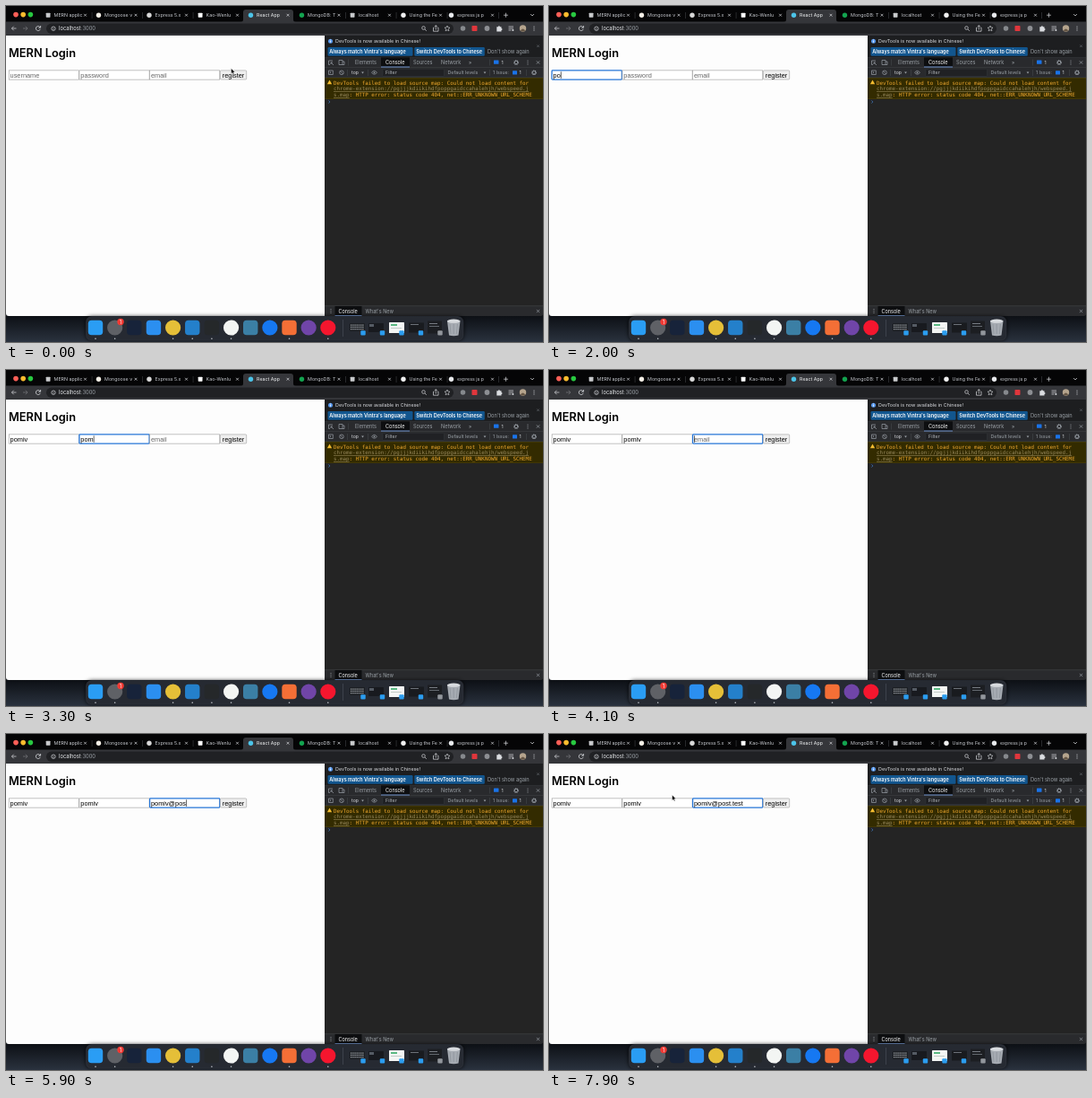
Animation, 600 px wide and 375 px high, one loop 8000 ms. Source, as an HTML page:

```html
<!DOCTYPE html>
<html lang="en">
<head>
<meta charset="utf-8">
<title>MERN Login</title>
<style>
  html, body { margin: 0; width: 100%; height: 100%; overflow: hidden; background: #12161c; }
  svg { display: block; width: 600px; height: 375px; }
  text { font-family: Inter, Roboto, sans-serif; white-space: pre; }
  .form { font-family: "Liberation Sans", Arial, sans-serif; }
  .mono { font-family: "DejaVu Sans Mono", monospace; }
</style>
</head>
<body>
<svg id="stage" viewBox="0 0 600 375" xmlns="http://www.w3.org/2000/svg"></svg>
<script>
const stage = document.getElementById('stage');
const LOOP = 8000;
const GREY = '#9aa0a6', LIGHT = '#dadce0', BLUE = '#1a73e8';

const rect = (x, y, w, h, fill, r = 0, extra = '') =>
  `<rect x="${x}" y="${y}" width="${w}" height="${h}" fill="${fill}" rx="${r}" ${extra}/>`;
const disc = (x, y, r, fill, extra = '') =>
  `<circle cx="${x}" cy="${y}" r="${r}" fill="${fill}" ${extra}/>`;
const line = (d, color = GREY, width = .7) =>
  `<path d="${d}" fill="none" stroke="${color}" stroke-width="${width}"/>`;
const text = (x, y, s, size, fill, extra = '') =>
  `<text x="${x}" y="${y}" font-size="${size}" fill="${fill}" ${extra}>${s}</text>`;
const cross = (x, y, r = 1.5, color = LIGHT) =>
  line(`M${x - r} ${y - r}l${2 * r} ${2 * r}m0 ${-2 * r}l${-2 * r} ${2 * r}`, color);
const dots = (x, y, color = GREY) => [-2, 0, 2].map(d => disc(x, y + d, .6, color)).join('');
const ring = (x, y, r, color = GREY) => disc(x, y, r, 'none', `stroke="${color}" stroke-width=".7"`);
const gear = (x, y) => disc(x, y, 2.2, 'none', `stroke="${GREY}" stroke-width="1.2" stroke-dasharray="1.1 .6"`) + ring(x, y, 1.7);
const arrowDown = (x, y, color = GREY) => `<path d="M${x - 1.4} ${y - .9}h2.8l-1.4 2z" fill="${color}"/>`;

function tabBar() {
  const tabs = [
    [47, 'MERN applic', '#c8cacc'], [103.5, 'Mongoose v', '#f4efe6'], [160, 'Express 5.x', '#d8d8d8'],
    [217, 'Kao-Wenlu', '#ffffff'], [273.5, 'React App', '#4cc4e8'], [330.5, 'MongoDB: T', '#13a34f'],
    [387, 'localhost', '#c8cacc'], [444, 'Using the Fe', '#f0f0f0'], [497.5, 'express js p', '#e8eaed']
  ];
  let out = rect(0, 0, 600, 18, '#050506');
  ['#ff5f57', '#febc2e', '#28c840'].forEach((c, i) => out += disc(11 + 8.2 * i, 9.6, 2.8, c));
  out += `<path d="M262 18q3 0 3-3V7q0-3 3-3h50q3 0 3 3v8q0 3 3 3z" fill="#35363a"/>`;
  tabs.forEach(([x, label, color], i) => {
    out += i % 3 ? disc(x, 10.2, 2.7, color) : rect(x - 2.3, 7.7, 4.8, 5, color, .6);
    out += text(x + 6.6, 12.1, label, 5.3, i == 4 ? '#f1f3f4' : '#c8cbd0');
    out += cross(x + (i == 8 ? 46 : 41.5), 10.2, 1.4);
    if (i != 3 && i != 4) out += rect(x + (i == 8 ? 53 : 48.8), 7, .5, 7, '#4a4c50');
  });
  return out + line('M556 10.2h5m-2.5-2.5v5', LIGHT) + line('M586 9l2 2 2-2', LIGHT);
}

function toolbar() {
  let out = rect(0, 17.5, 600, 15.5, '#35363a') + rect(45, 19.5, 455, 11.5, '#202124', 5.7);
  out += line('M11.5 25h-5m2.2-2.3L6.4 25l2.3 2.3', LIGHT);
  out += line('M19 25h5m-2.2-2.3L24.1 25l-2.3 2.3', '#77797d');
  out += line('M38.2 24a2.5 2.5 0 1 0 .1 1.8M38.6 22v2.2h-2.2', LIGHT, .8);
  out += ring(53, 25.2, 2.2, LIGHT) + rect(52.7, 24.6, .6, 2, LIGHT);
  out += text(59, 27.2, 'localhost<tspan fill="#9aa0a6">:3000</tspan>', 5.8, '#e8eaed');
  out += ring(466.5, 24.5, 1.8, LIGHT) + line('M468 26l1.8 1.8', LIGHT);
  out += line('M478.5 24.2h-1v4h5.5v-4h-1M480.3 26.5v-4.8m-1.5 1.4l1.5-1.5 1.5 1.5', LIGHT);
  out += line('M493 22l.9 2 2.1.2-1.6 1.5.5 2.1-1.9-1.1-1.9 1.1.5-2.1-1.6-1.5 2.1-.2z', LIGHT, .6);
  out += disc(510.5, 25, 2.8, '#86898d') + rect(520.5, 22, 6, 6, '#e0363c', .8) + disc(537.5, 25, 2.9, '#8d8f93');
  out += `<path d="M548.3 23.2h1.6a1 1 0 0 1 2 0h1.6v1.7a1 1 0 0 1 0 2v1.7h-5.2z" fill="${LIGHT}"/>`;
  out += line('M561.5 23h5.5m-5.5 2h5.5m-5.5 2h3', LIGHT) + disc(566.4, 27, 1, LIGHT);
  out += disc(577.5, 25, 3.7, '#b5a48d') + `<path d="M574.8 27.4q2.7-4 5.4 0q-2.7 2.2-5.4 0" fill="#665746"/>`;
  return out + dots(590, 25, LIGHT);
}

function page() {
  let out = `<path d="M0 33h356v313H3q-3 0-3-3z" fill="#fdfdfd"/>`;
  out += text(3, 56.9, 'MERN Login', 12.8, '#000', 'font-weight="600"');
  for (let i = 0; i < 3; i++) {
    out += `<rect id="box${i}" x="${3.2 + 78.7 * i}" y="71.9" width="78.2" height="10.2" fill="#fff"/>`;
    out += text(4.6 + 78.7 * i, 79.6, '', 7.35, '#000', `class="form" id="value${i}"`);
  }
  out += rect(239.4, 71.9, 29.3, 10.1, '#efefef', 1, 'stroke="#8a8a8a" stroke-width=".5"');
  return out + text(241.8, 79.6, 'register', 7.35, '#000', 'class="form"');
}

function devtools() {
  let out = `<path d="M356 33H600V343q0 3-3 3H356z" fill="#242424"/>`;
  const strip = (y, h, fill) => rect(356, y, 244, h, fill);
  const rule = y => strip(y, .5, '#494c50');

  // Language notice
  out += strip(33, 24, '#1d1e20') + rule(57);
  out += disc(362.5, 39.2, 2.5, '#5a9bf0') + rect(362.1, 38.7, .8, 2, '#fff') + rect(362.1, 37.5, .8, .7, '#fff');
  out += text(368, 41.2, 'DevTools is now available in Chinese!', 5.4, LIGHT);
  out += rect(359.5, 46, 95, 9.8, '#12568f', 1.2) + rect(456.3, 46, 78.5, 9.8, '#12568f', 1.2);
  out += text(361.3, 52.9, "Always match Vintra's language", 5.5, '#fff', 'font-weight="600"');
  out += text(458.3, 52.9, 'Switch DevTools to Chinese', 5.5, '#fff', 'font-weight="600"');
  out += text(538, 52.9, "Don't show again", 5.7, GREY) + cross(594.5, 44.7, 1.2, '#6b6f74');

  // Panel tabs
  out += strip(57.4, 11, '#292a2d') + rule(68.4);
  out += line('M365 61h-4.5v4.5h1.5M363 63l3 3m-3-1v-2h2', GREY);
  out += line('M372 60.5h4v5h-4zM376 62h2v3.5h-2', GREY) + rect(382, 59.5, .5, 7, '#494c50');
  out += rect(419, 57.4, 32, 11, '#0d0e10') + rect(419, 67.6, 32, .9, '#8ab4f8');
  [[390, 'Elements'], [424, 'Console'], [455, 'Sources'], [486, 'Network'], [517, '»']].forEach(([x, s], i) =>
    out += text(x, 64.8, s, 5.55, i == 1 ? '#fff' : GREY));
  out += rect(540, 59.5, .5, 7, '#494c50') + rect(545, 60.5, 5.5, 4.3, BLUE, .5) + text(553.5, 64.8, '1', 5.3, LIGHT);
  out += gear(570, 63) + dots(583, 63) + cross(594.5, 63, 1.7, GREY);

  // Console controls
  out += strip(68.9, 10.8, '#292a2d') + rule(79.7);
  out += line('M360.5 72h4.8v4.5h-4.8zM361.8 73.2l1.2 1-1.2 1', GREY);
  out += ring(375, 74.3, 2.3) + line('M373.4 72.7l3.2 3.2') + rect(381.5, 71, .5, 7, '#494c50');
  out += text(386, 76.2, 'top', 5.2, LIGHT) + arrowDown(398.5, 74.3) + rect(404, 71, .5, 7, '#494c50');
  out += line('M408.5 74.3q3-3.8 6 0q-3 3.8-6 0', GREY) + disc(411.5, 74.3, .9, GREY);
  out += rect(420.5, 70.3, 69, 8.2, '#202124', 1, 'stroke="#3c4043" stroke-width=".4"');
  out += text(424, 76.3, 'Filter', 5.4, '#b0b4b9') + text(493.5, 76.2, 'Default levels', 5.3, GREY) + arrowDown(535, 74.3);
  out += rect(540, 71, .5, 7, '#494c50') + text(544, 76.2, '1 Issue:', 5.2, GREY);
  out += rect(566, 72.3, 5, 4.2, BLUE, .5) + text(573.5, 76.2, '1', 5.2, LIGHT);
  out += rect(581, 71, .5, 7, '#494c50') + gear(590, 74.3);

  // Warning
  const mono = 'class="mono"', link = mono + ' text-decoration="underline"';
  out += strip(80.2, 23.6, '#332b00') + strip(80.2, .4, '#594a00') + strip(103.4, .4, '#594a00');
  out += `<path d="M361.5 82.6l2.6 4.6h-5.2z" fill="#f5bd30"/>`;
  out += text(366, 87.6, 'DevTools failed to load source map: Could not load content for', 5.85, '#f0a92e', mono);
  out += text(366, 94.3, 'chrome-extension://pgjjjkdiikihdfpoppgaidccahalehjh/webspeed.j', 5.85, '#97885c', link);
  out += text(366, 101, '<tspan fill="#97885c" text-decoration="underline">s.map</tspan>: HTTP error: status code 404, net::ERR_UNKNOWN_URL_SCHEME', 5.85, '#f0a92e', mono);
  out += line('M360.3 105.4l1.6 1.6-1.6 1.6', '#3f7fca');

  // Drawer
  out += `<path d="M356 335H600V343q0 3-3 3H356z" fill="#292a2d"/>` + rule(334.6);
  out += dots(363, 340.5) + rect(367.5, 335, 30, 11, '#0d0e10') + rect(367.5, 345.2, 30, .8, '#8ab4f8');
  out += text(371.5, 342.6, 'Console', 5.5, '#fff') + text(401.5, 342.6, "What's New", 5.5, GREY);
  return out + cross(594.5, 340.5, 1.6, GREY);
}

function dock() {
  const apps = ['#2a9df4', '#5f6166', '#17233a', '#2b8ff0', '#e5bf38', '#2480cb', '#25282a',
    '#f3f5f3', '#3b7fa5', '#1678f2', '#f46f36', '#7045a8', '#f5162e'];
  const round = [1, 4, 7, 9, 11, 12];
  let out = rect(89.5, 347, 421.5, 26, '#000', 6, 'filter="url(#soft)"');
  out += rect(89.5, 346.6, 421.5, 26.6, '#262a32', 6, 'stroke="#3d424c" stroke-width=".4"');
  apps.forEach((color, i) => {
    const x = 100 + 21.65 * i;
    out += round.includes(i) ? disc(x, 359, 8.6, color) : rect(x - 8.2, 350.8, 16.4, 16.4, color, 3.8);
    if ([0, 1, 4, 5, 6, 7, 10, 12].includes(i)) out += disc(x, 371.2, .8, '#c4c8cf');
  });
  out += disc(128, 352.5, 3.7, '#f23b35') + text(126.8, 354.6, '1', 5.6, '#fff');
  out += rect(376, 350, .5, 19, '#555a64');

  // Minimised windows
  out += rect(384, 354, 17, 9, '#1b1e22', 1);
  for (let i = 0; i < 21; i++) out += rect(385 + i % 7 * 2.2, 355.5 + (i / 7 | 0) * 2.3, 1.3, 1.2, '#aeb2b8');
  out += rect(405, 354, 17, 10, '#181a1f', .6) + rect(406, 355, 5, 3, '#555b64');
  out += rect(428, 353, 17, 12, '#f3f5f4', .6) + rect(430, 355, 7, 2, '#5bb983') + rect(430, 359, 12, 1, '#c4cbc8');
  out += rect(450, 353.5, 17, 11, '#191b1f', .6) + rect(452, 355, 9, 1, '#6d7279');
  out += rect(471, 351.5, 16, 14, '#1c1e22', .6) + rect(473, 354, 9, 1, '#777c83') + rect(473, 357, 11, 1, '#646970');
  [399, 420.5, 442, 463.5, 485].forEach((x, i) => out += rect(x - 2.7, 362.2, 5.4, 5.4, i == 4 ? '#92969c' : '#2b9df0', 1));

  // Bin
  out += `<path d="M493 351.5h14.5l-2 16q-5.2 1.6-10.5 0z" fill="#a6abb2"/>`;
  out += `<ellipse cx="500.2" cy="351.7" rx="7.3" ry="2.1" fill="#d7dade"/>`;
  return out + line('M496 355l1 11m3.2-11v11m4.2-11l-1 11', '#858b93', .6);
}

stage.innerHTML = `<defs><linearGradient id="desk" x2="0" y2="1">
  <stop offset=".15" stop-color="#0c0f14"/><stop offset="1" stop-color="#2a323e"/></linearGradient>
  <filter id="soft" x="-5%" y="-60%" width="110%" height="220%"><feGaussianBlur stdDeviation="2.5"/></filter></defs>`
  + rect(0, 340, 600, 35, 'url(#desk)')
  + tabBar() + toolbar() + page() + devtools() + dock()
  + `<rect id="caret" y="73.3" width=".6" height="7.6" fill="#000"/>
  <path id="arrow" d="M0 0v6.2l1.5-1.3 1 2.2 1-.5-1-2.1h2z" fill="#000" stroke="#fff" stroke-width=".5"/>
  <path id="beam" d="M-1.4-3.2q1.4 0 1.4.8v4.8q0 .8-1.4.8m2.8-6.4q-1.4 0-1.4.8m0 4.8q0 .8 1.4.8" fill="none" stroke="#222" stroke-width=".7"/>`;

// Each field: placeholder, typed text, time of focus, time of each key
const keys = (start, gap, count) => Array.from({ length: count }, (_, i) => start + gap * i);
const fields = [
  { hint: 'username', value: 'pomiv', focus: 1000, keys: keys(1750, 170, 5) },
  { hint: 'password', value: 'pomiv', focus: 2800, keys: keys(3000, 130, 5) },
  { hint: 'email', value: 'pomiv@post.test', focus: 3900,
    keys: [...keys(4250, 110, 5), 5300, ...keys(5560, 130, 3), ...keys(5960, 80, 6)] }
];
const $ = id => document.getElementById(id);
const ease = (t, a, b) => {
  const p = Math.min(1, Math.max(0, (t - a) / (b - a)));
  return p * p * (3 - 2 * p);
};
const show = (el, on) => el.setAttribute('visibility', on ? 'visible' : 'hidden');

function drawFields(t) {
  let active = -1;
  fields.forEach((f, i) => { if (t >= f.focus) active = i; });
  fields.forEach((f, i) => {
    const typed = f.value.slice(0, f.keys.filter(k => k <= t).length);
    const label = $('value' + i), box = $('box' + i);
    label.textContent = typed || f.hint;
    label.setAttribute('fill', typed ? '#000' : '#666');
    box.setAttribute('stroke', i == active ? '#2676d8' : '#858585');
    box.setAttribute('stroke-width', i == active ? 1.3 : .5);
    box.setAttribute('rx', i == active ? .8 : 0);
    if (i == active) {
      const last = Math.max(f.focus, ...f.keys.filter(k => k <= t));
      const x = 4.6 + 78.7 * i + (typed ? label.getComputedTextLength() + .2 : 0);
      $('caret').setAttribute('x', x);
      show($('caret'), (t - last) % 1000 < 500);
    }
  });
  if (active < 0) show($('caret'), false);
}

function drawPointer(t) {
  const back = t > 4000;
  const p = back ? ease(t, 7300, 7900) : ease(t, 100, 950);
  const x = back ? 54.5 + 83 * p : 251.5 - 197 * p;
  const y = back ? 76.5 - 8.5 * p : 69.5 + 7 * p;
  const visible = t < 1750 || t >= 7300;
  const overField = y > 71.5 && x < 239;
  for (const [id, on] of [['arrow', !overField], ['beam', overField]]) {
    $(id).setAttribute('transform', `translate(${x} ${y})`);
    show($(id), visible && on);
  }
}

function frame(now) {
  const t = now % LOOP;
  drawFields(t);
  drawPointer(t);
  requestAnimationFrame(frame);
}
frame(0);
</script>
</body>
</html>
```
